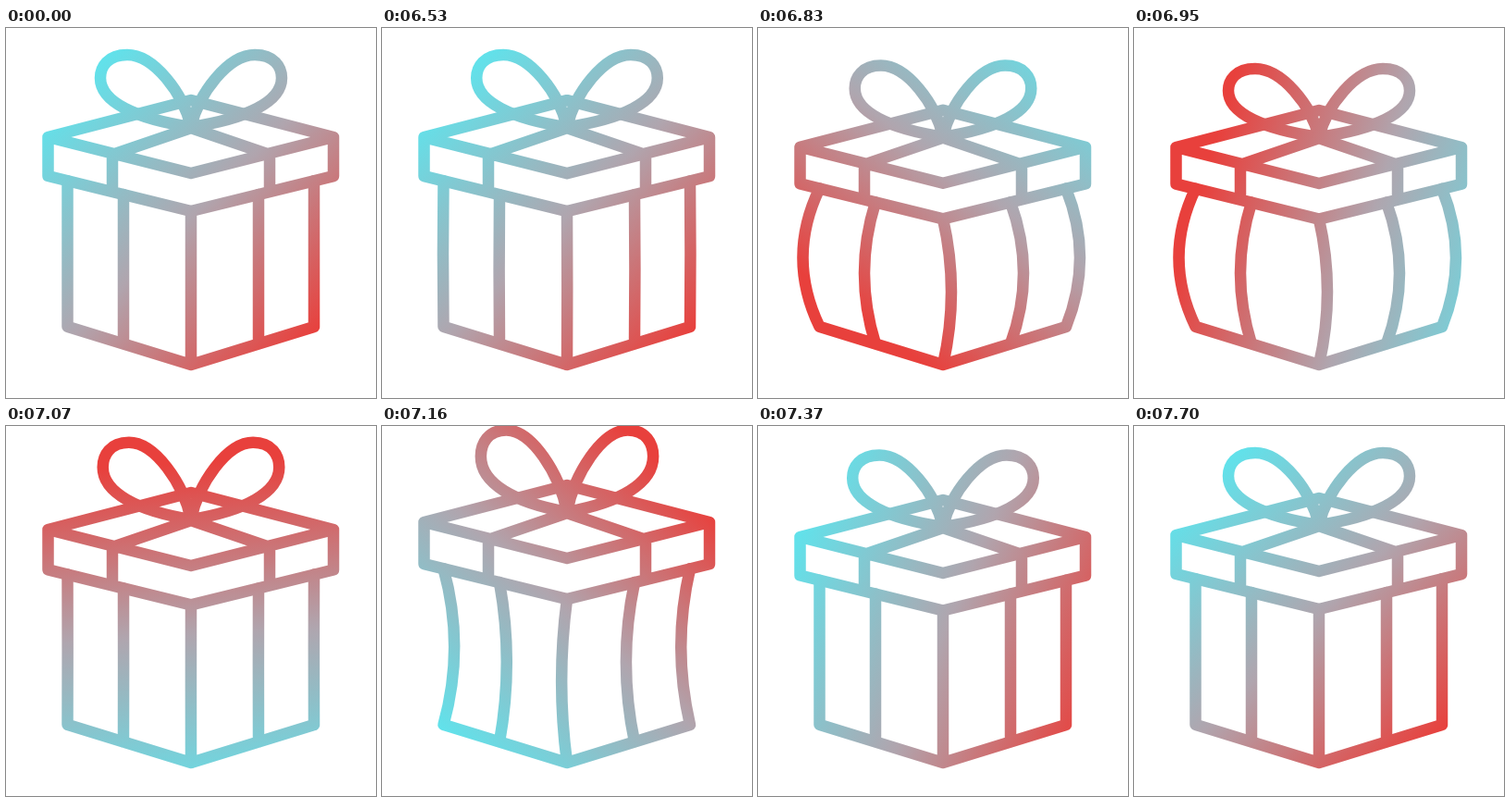
Animation, 400 px wide and 400 px high, one loop 7.73 s. Source, as an HTML page:

```html
<!DOCTYPE html>
<html lang="en">
<head>
<meta charset="utf-8">
<title>Gift box</title>
<style>
  html, body { margin: 0; width: 100%; height: 100%; overflow: hidden; background: #fff; }
  svg { display: block; width: 100%; height: 100%; }
  path { fill: none; stroke: url(#tint); stroke-width: 12.5; stroke-linecap: round; stroke-linejoin: round; }
</style>
</head>
<body>
<svg viewBox="0 0 400 400">
  <defs>
    <linearGradient id="tint" gradientUnits="userSpaceOnUse">
      <stop offset="0" stop-color="#62e1ea"/>
      <stop offset="0.5" stop-color="#b0a5ae"/>
      <stop offset="1" stop-color="#e8403c"/>
    </linearGradient>
  </defs>
  <path id="body"/>
  <path id="lid"/>
  <path id="bow"/>
</svg>
<script>
const LOOP = 7730, REST = 6530, STEP = 30, STEPS = 40;

// key points [step, value]: squash, stretch, settle
const LIFT = [[0, 0], [14, 12], [22, -14], [30, 2.6], [STEPS, 0]];
const BULGE = [[0, 0], [9, 1], [15, 1], [22, -0.65], [29, 0], [STEPS, 0]];

// upright lines of the box: [x, sideways reach when bulging]
const SIDES = [[66.5, -18], [127, -12], [200, 9], [273, 14], [333, 15]];

const el = id => document.getElementById(id);
const tint = el('tint');
const lidEdge = x => 198 - 0.246 * Math.abs(x - 200);
const floorEdge = x => 364 - 0.308 * Math.abs(x - 200);

// sine ease in and out between key points
function track(keys, n) {
  const i = Math.max(1, keys.findIndex(k => n <= k[0]));
  const [n0, a] = keys[i - 1], [n1, b] = keys[i];
  return a + (b - a) * (1 - Math.cos(Math.PI * (n - n0) / (n1 - n0))) / 2;
}

function turn(u) {
  const p = u * (1.35 - 0.35 * u);
  return 45 + 360 * p ** 3 * (6 * p * p - 15 * p + 10);
}

function loopPath(side, base, sx, sy) {
  const p = (x, y) => `${200 + side * x * sx} ${base + y * sy}`;
  return `M${p(0, 0)}C${p(8, -36)} ${p(40, -78)} ${p(69, -78)}`
    + `C${p(90, -78)} ${p(98, -65)} ${p(98, -53)}`
    + `C${p(98, -27)} ${p(60, -9)} ${p(0, 0)}`;
}

function paint(angle) {
  const r = angle * Math.PI / 180, c = Math.cos(r), s = Math.sin(r);
  const shift = 35 * Math.cos(r - 0.17) - 22;
  [-185, 185].forEach((half, i) => {
    tint.setAttribute('x' + (i + 1), 200 + c * (shift + half));
    tint.setAttribute('y' + (i + 1), 195 + s * (shift + half));
  });
}

function draw(n) {
  const top = track(LIFT, n), low = 0.78 * top, bulge = track(BULGE, n);
  const pinch = n < 30 ? Math.sin(Math.PI * n / 15) ** 2 : 0;

  el('body').setAttribute('d', SIDES.map(([x, reach]) => {
    const y1 = lidEdge(x) + low, y2 = floorEdge(x);
    return `M${x} ${y1}Q${x + 2 * reach * bulge} ${(y1 + y2) / 2} ${x} ${y2}`;
  }).join('') + 'M67 323L200 364L333 323');

  const t = y => y + top, b = x => lidEdge(x) + low;
  el('lid').setAttribute('d',
    `M45.5 ${t(118)}L200 ${t(78)}L354 ${t(118)}L200 ${t(157)}Z`
    + `M45.5 ${t(118)}V${b(45.5)}L200 ${b(200)}L354 ${b(354)}V${t(118)}`
    + `M115 ${b(115)}V${t(137)}L200 ${t(108)}L285 ${t(137)}V${b(285)}`);

  const sx = 1 - 0.05 * pinch, sy = 1 - 0.0047 * top + 0.07 * pinch;
  el('bow').setAttribute('d', [-1, 1].map(side => loopPath(side, t(107), sx, sy)).join(''));

  paint(turn(n / STEPS));
}

const begin = performance.now();
let shown = -1;

function tick() {
  const time = (performance.now() - begin) % LOOP;
  const n = time < REST ? 0 : Math.min(STEPS, Math.floor((time - REST) / STEP) + 1);
  if (n !== shown) draw(shown = n);
  requestAnimationFrame(tick);
}
tick();
</script>
</body>
</html>
```
